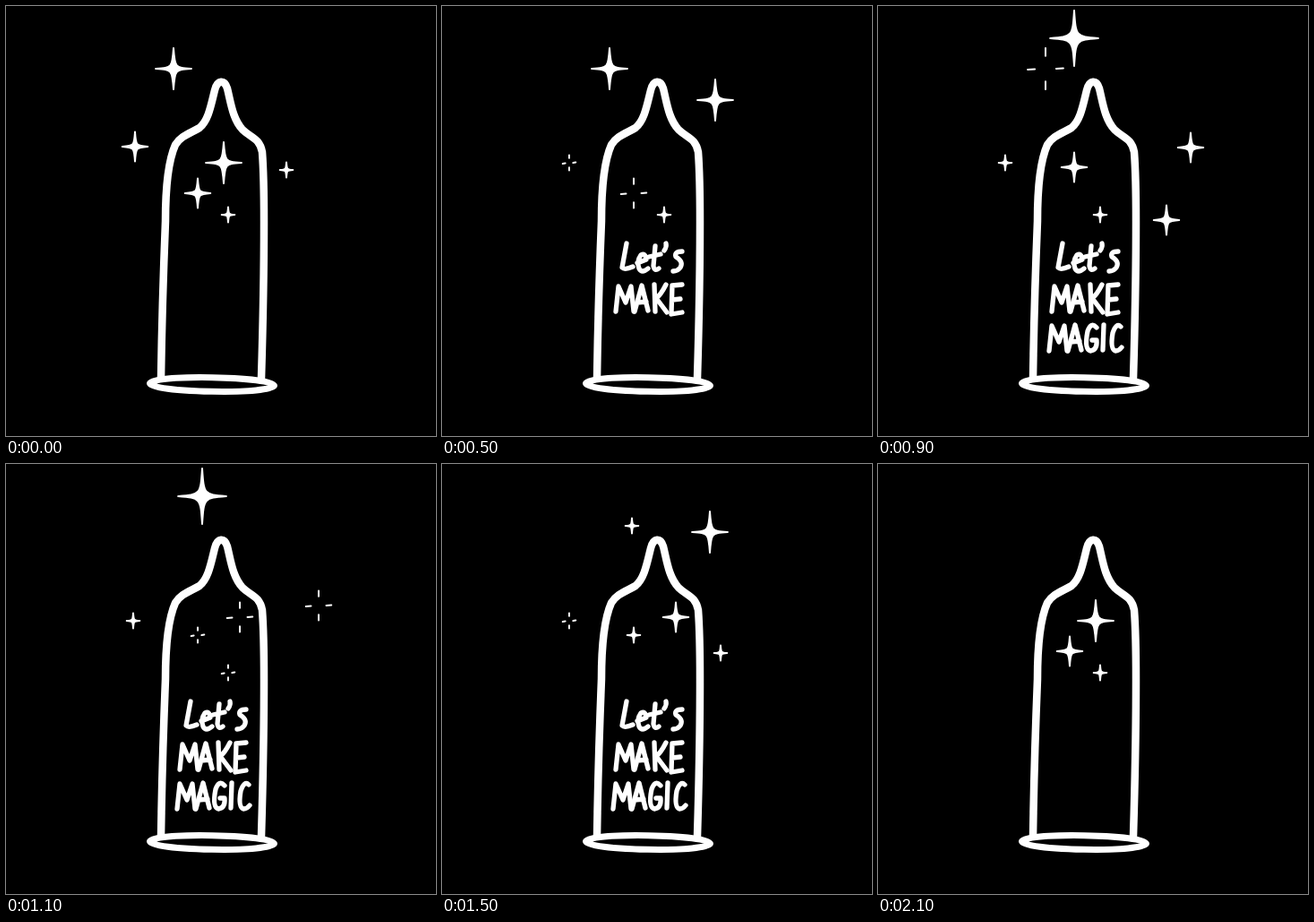
Animation of 480x480 px, one loop 2200 ms. Source, as an HTML page:

```html
<!DOCTYPE html>
<html lang="en">
<head>
<meta charset="utf-8">
<title>Let's make magic</title>
<style>
  html, body { margin: 0; width: 100%; height: 100%; overflow: hidden; background: #000; }
  svg { display: block; width: 100%; height: 100%; }
  path, ellipse { fill: none; stroke: #fff; stroke-linecap: round; stroke-linejoin: round; }
  .body { stroke-width: 8.5; stroke-linecap: butt; }
  .rim { stroke-width: 7; }
  .letter { stroke-width: 5.3; }
  .star { stroke-width: 2; }
  .solid { fill: #fff; }
</style>
</head>
<body>
<svg viewBox="0 0 480 480" role="img" aria-label="Let's make magic">
  <path class="body" d="M173 416C174 350 176 290 178 240C178 205 181 173 189 155C195 145 206 142 216 136C226 128 229 110 233 94C236 82 244 82 247 92C251 108 253 126 264 138C273 147 283 147 286 163C288 190 288 210 288 240C288 290 287 350 285 416"/>
  <ellipse class="rim" cx="230" cy="422.5" rx="69.5" ry="7.8" transform="rotate(1 230 422)"/>
</svg>
<script>
const STEP = 100, STEPS = 22, TEXT_OFF = 19;
const svg = document.querySelector("svg");

function add(parent, tag, attributes) {
  const node = document.createElementNS("http://www.w3.org/2000/svg", tag);
  for (const name in attributes) node.setAttribute(name, attributes[name]);
  return parent.appendChild(node);
}

// Hand lettering: advance width and pen strokes of each letter.
const glyphs = {
  L: [18, "M7 0L2 27Q5 30 14 26"],
  e: [14, "M1 22L11 18Q10 10 5 13Q0 20 3 28Q6 34 13 28"],
  t: [16, "M7 3L5 25Q6 32 11 28M0 15L13 12"],
  "'": [10, "M3 0Q4 4 1 8"],
  s: [14, "M11 9Q2 9 4 15Q13 20 9 27Q6 31 1 31"],
  M: [21, "M1 30L4 2 12 20 18 2 21 30"],
  A: [20, "M1 30L9 1 16 29M4 20L14 19"],
  K: [21, "M3 0L4 30M16 0Q10 12 5 15L17 31"],
  E: [16, "M2 1L1 33 13 31M2 1L13 0M2 17L11 16"],
  G: [20, "M13 4Q7-3 3 8Q-1 28 6 30Q14 29 13 18L8 18"],
  I: [8, "M1 1L0 29"],
  C: [14, "M12 3Q7-2 3 10Q0 28 6 30Q10 30 13 26"]
};

function word(text, x, y, on) {
  const node = add(svg, "g", {});
  for (const letter of text) {
    const [advance, d] = glyphs[letter];
    add(node, "path", { class: "letter", d, transform: `translate(${x} ${y})` });
    x += advance;
  }
  return { node, on };
}

function sparkle(rx, ry) {
  const c = rx * .07;
  const corner = (sx, sy, x, y) => `C${sx * c} ${sy * c} ${sx * c} ${sy * c} ${x} ${y}`;
  return `M0 ${-ry}` + corner(1, -1, rx, 0) + corner(1, 1, 0, ry) +
    corner(-1, 1, -rx, 0) + corner(-1, -1, 0, -ry) + "Z";
}

function burst(rx, ry) {
  const x = rx * .6, y = ry * .62;
  return `M0 ${-ry}V${-y}M0 ${y}V${ry}M${-rx} 1L${-x} .5M${x} 0L${rx} -.5`;
}

// A star is solid from step `on` for `life` steps, with a burst at either end.
// Those that light up once the text has gone have no opening burst.
function star(x, y, size, on, life = 4) {
  const ry = size - 1, rx = size * .87 - 1, transform = `translate(${x} ${y})`;
  return {
    on, off: on + life,
    first: on < TEXT_OFF ? on - 1 : on,
    solid: add(svg, "path", { class: "star solid", d: sparkle(rx, ry), transform }),
    ticks: add(svg, "path", { class: "star", d: burst(rx, ry), transform })
  };
}

const words = [
  word("Let's", 199, 265, 2),
  word("MAKE", 193, 311, 4),
  word("MAGIC", 190, 355, 6)
];

const SMALL = 9.5, MEDIUM = 17.5, LARGE = 24, HUGE = 32;
const stars = [
  star(305, 105, LARGE, 4),
  star(142, 175, SMALL, 6, 9),
  star(349, 158, MEDIUM, 7),
  star(219, 180, MEDIUM, 8, 2),
  star(322, 239, MEDIUM, 8, 2),
  star(219, 36, HUGE, 9),
  star(214, 191, SMALL, 12, 6),
  star(261, 171, MEDIUM, 12),
  star(299, 76, LARGE, 13),
  star(212, 69, SMALL, 14),
  star(311, 211, SMALL, 14),
  star(248, 233, SMALL, 19, 14),
  star(214, 209, MEDIUM, 20, 7),
  star(243, 175, LARGE, 21),
  star(187, 70, LARGE, 22, 9),
  star(144, 157, MEDIUM, 22),
  star(313, 183, SMALL, 22)
];

const show = (node, visible) => node.setAttribute("visibility", visible ? "visible" : "hidden");

function render(ms) {
  const now = Math.floor(ms / STEP) % STEPS;
  const within = (from, to) => [now, now + STEPS].some(t => t >= from && t < to);
  for (const { on, off, first, solid, ticks } of stars) {
    show(solid, within(on, off));
    show(ticks, within(first, on) || within(off, off + 1));
  }
  for (const { node, on } of words) show(node, within(on, TEXT_OFF));
}

const start = performance.now();
function tick() {
  render(performance.now() - start);
  requestAnimationFrame(tick);
}
tick();
</script>
</body>
</html>
```
